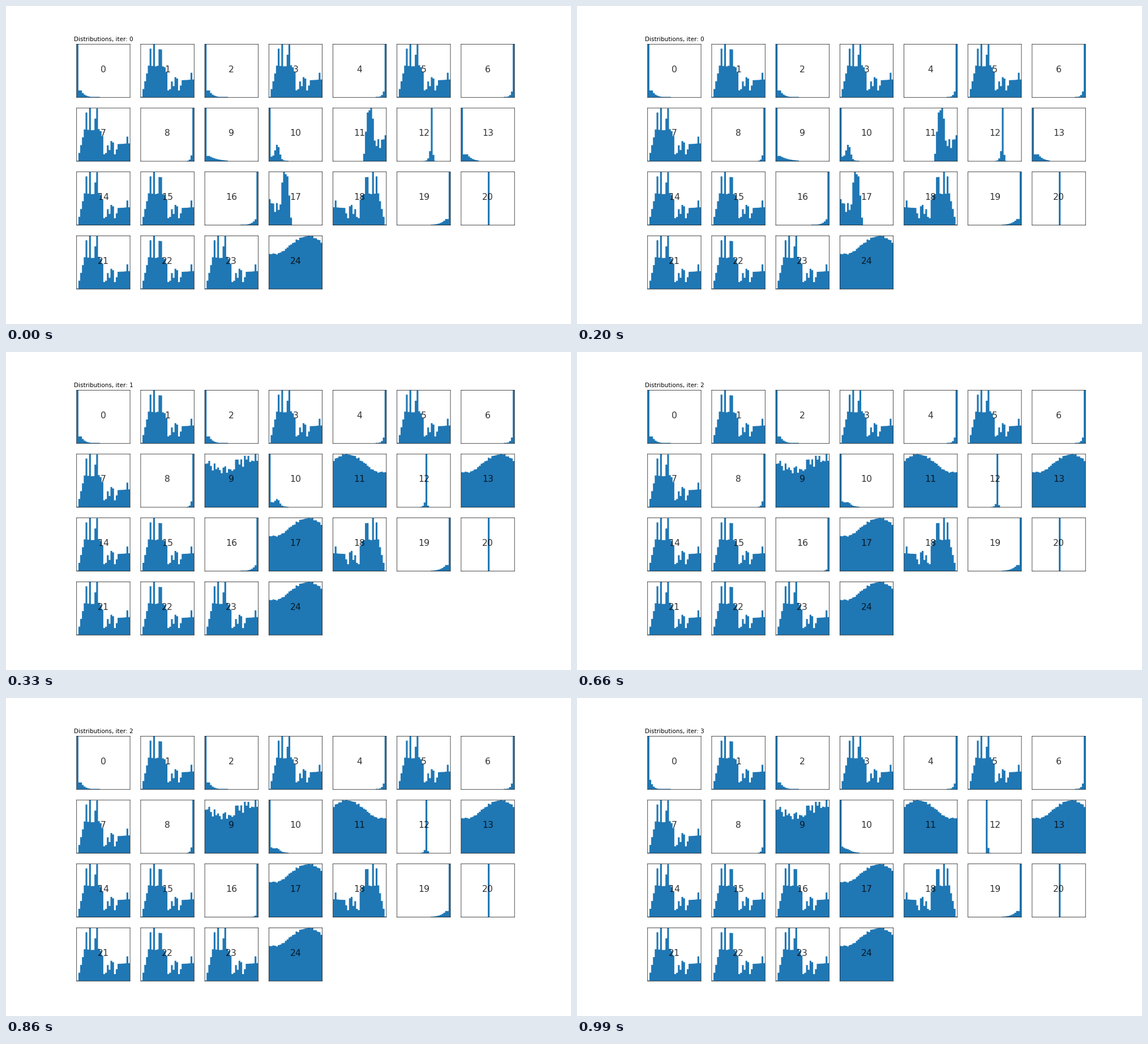
These frames come from a looping animation (998x561 px, 1.32 s). A matplotlib script:

```python
import numpy as np
import matplotlib.pyplot as plt
from matplotlib.animation import FuncAnimation

W, H, DPI = 998, 561, 64
PT = 62.4 / DPI  # the layout is designed for a 16 inch wide figure
BINS, PANELS = 30, 25
K = np.arange(BINS)
rng = np.random.default_rng(4)


def bell(center, height, width):
    return height * np.exp(-((K - center) / width) ** 2)


def unit(h):
    return h / h.max()


def sample(peak):
    """Ramp with three peaks, then a low uneven plateau."""
    h = np.interp(K, [0, 4, 13, 14, 15, 18, 21, 23, 29],
                  [.01, .59, .56, .47, .13, .2, .12, .32, .33])
    h += bell(5, .32, .4) + bell(7, .41, .4) + bell(peak, .48, .8)
    h += bell(17, .12, .4) + bell(19.5, .3, .8) + bell(28, .13, .5)
    return unit(h)


def squeeze(h, start, width):
    """Rebin h into `width` bins from `start`."""
    total = np.append(0, np.cumsum(h))
    edges = (np.arange(BINS + 1) - start) / width * BINS
    return unit(np.diff(np.interp(edges, np.arange(BINS + 1), total)))


def tail(end, height, scale, flat=1):
    """Full first bin, then a plateau that decays until bin `end`."""
    h = height * np.exp(-np.maximum(K - flat, 0) / scale)
    h[0] = 1
    return np.where(K < end, np.maximum(h, .01), 0)


def spike(center, left=0, right=0):
    d = K - center
    h = np.where(d < 0, left * np.exp((d + 1) / .8),
                 right * np.exp((1 - d) / .3))
    h[center] = 1
    return np.where(h > .003, h, 0)


RAW, SHIFTED = sample(10.5), sample(10.7)
SMOOTH = unit(.795 - .165 * np.cos(2 * np.pi * (K - 2) / 39)
              + rng.normal(0, .008, BINS))
NOISY = unit(.8 + .1 * np.cos(2 * np.pi * (K - 26) / 34)
             + rng.uniform(-.11, .11, BINS))


def heights(i):
    """Histogram heights of all panels at iteration i."""
    p = [RAW if n % 7 == 1 else SHIFTED for n in range(PANELS)]
    p[0] = tail(13, .18, 1.6) if i == 3 else tail(13, .13, 2.2, 2)
    p[2] = tail(13, .13, 2.2, 2)
    p[4] = p[6] = tail(6, .11, 1.1)[::-1]
    p[8] = tail(4, .11, .8)[::-1]
    p[10] = tail(11, .08 + .015 * i, 4) + bell(4.3, .28 * np.exp(-.9 * i), 1.7)
    p[10][0] = 1
    p[12] = [spike(19, .19, .12), spike(16, .09, .03),
             spike(16, .06, .04), spike(10, 0, .1)][i]
    p[18] = RAW[::-1]
    p[19] = tail(11, .115, 3, 2)[::-1]
    p[20] = spike(15)
    p[24] = SMOOTH
    if i == 0:
        p[9] = tail(13, .1, 5, 2)
        p[11] = squeeze(RAW, 17, 13)
        p[13] = tail(10, .13, 2.8, 3)
        p[17] = squeeze(RAW[::-1], 0, 13)
    else:
        p[9], p[11], p[13], p[17] = NOISY, SMOOTH[::-1], SMOOTH, SMOOTH
    if i < 2:
        p[16] = tail(10, .11, 2.2)[::-1]
    else:
        p[16] = tail(3, .03, 1)[::-1] if i == 2 else RAW
    return p


fig = plt.figure(figsize=(W / DPI, H / DPI), dpi=DPI, facecolor="white")
fig.subplots_adjust(left=.125, right=.9, bottom=.11, top=.88,
                    wspace=.2, hspace=.2)
hists = []
for n in range(PANELS):
    ax = fig.add_subplot(4, 7, n + 1)
    hists.append(ax.stairs(np.zeros(BINS), fill=True, color="#1f77b4",
                           linewidth=0, snap=False))
    ax.set(xlim=(0, BINS), ylim=(0, 1), xticks=[], yticks=[])
    for spine in ax.spines.values():
        spine.set(linewidth=.8 * PT, snap=False)
    ax.text(.5, .473, str(n), transform=ax.transAxes, ha="center",
            va="baseline", fontsize=18 * PT, color="black", alpha=.8)
title = fig.axes[0].set_title("", fontsize=12 * PT, pad=6 * PT)


def update(i):
    title.set_text(f"Distributions, iter: {i}")
    for hist, h in zip(hists, heights(i)):
        hist.set_data(h)
    return []


anim = FuncAnimation(fig, update, frames=4, interval=330, repeat=True,
                     repeat_delay=0, blit=False)
plt.show()
```
